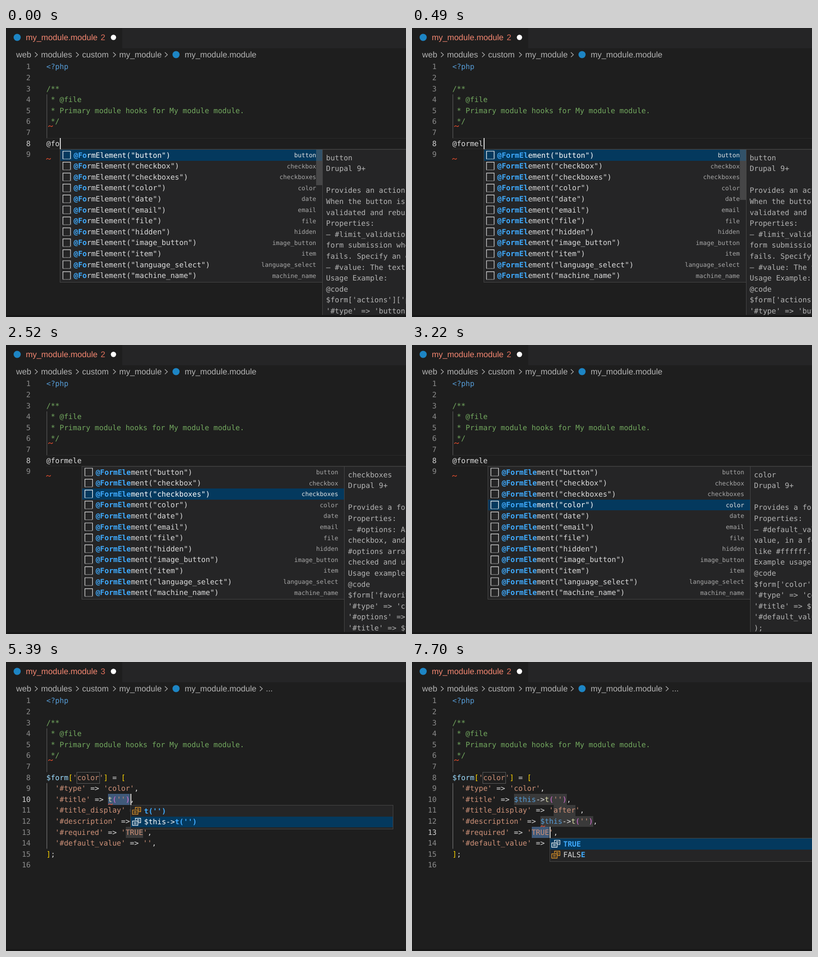
An HTML page that plays this animation: 788x570 px, repeating every 8 s.

```html
<!DOCTYPE html>
<html lang="en">
<head>
<meta charset="utf-8">
<title>Form element completion</title>
<style>
html, body { margin: 0; width: 100%; height: 100%; overflow: hidden; background: #1e1e1e; }
svg { display: block; }
rect { shape-rendering: crispEdges; }
text { white-space: pre; text-rendering: geometricPrecision; }
.code { font: 14.4px "DejaVu Sans Mono", monospace; }
.ui { font: 16.2px "Liberation Sans", Arial, sans-serif; fill: #b4b4b4; }
.hint { font: 12px "DejaVu Sans Mono", monospace; text-anchor: end; }
.match { font-weight: bold; fill: #3fabff; }
.num { text-anchor: end; fill: #8c8c8c; }
.stroke { fill: none; stroke-width: 1.2; }
</style>
</head>
<body>
<svg width="788" height="570" viewBox="0 0 788 570">
  <rect width="788" height="570" fill="#1e1e1e"/>
  <rect x="229" width="559" height="40" fill="#252526"/>
  <circle cx="22" cy="18.5" r="7" fill="#1d85c4"/>
  <circle cx="335" cy="52.5" r="7" fill="#1d85c4"/>
  <text class="ui" x="39" y="24" style="fill:#f48771">my_module.module</text>
  <circle cx="211.7" cy="18.5" r="5.2" fill="#fff"/>
  <g id="crumbs"></g>
  <g id="doc"></g>
  <rect id="cursor" width="2" height="21.6" fill="#d0d0d0"/>
  <g id="popup"></g>
  <rect id="thumb" y="240" width="12" fill="#797979"/>
  <path d="M0.5 0V570" stroke="#171717"/>
  <rect y="566" width="788" height="4" fill="#181818"/>
</svg>
<script>
const LOOP = 8000, LEFT = 79.5, CW = 8.669, LH = 21.6, TOP = 66, BASE = 15.4;
const $ = id => document.getElementById(id);
const colX = c => LEFT + c * CW;
const lineY = n => TOP + (n - 1) * LH;
const esc = s => s.replace(/&/g, "&amp;").replace(/</g, "&lt;").replace(/>/g, "&gt;");
const rect = (x, y, w, h, fill, more = "") =>
  `<rect x="${x}" y="${y}" width="${w}" height="${h}" fill="${fill}" ${more}/>`;
const path = (d, color) => `<path class="stroke" d="${d}" stroke="${color}"/>`;
const span = (s, fill) => `<tspan fill="${fill}">${esc(s)}</tspan>`;
const text = (x, y, body, cls = "code", fill = "#dcdcdc") =>
  `<text class="${cls}" x="${x}" y="${y}" fill="${fill}">${body}</text>`;
const squiggle = (x, y) => path(`M${x} ${y}q2 -3.6 4.3 -1.4t4.3 -1.2`, "#f0512f");
const codeLine = (n, body, fill) => text(LEFT, lineY(n) + BASE, body, "code", fill);

const elements = ["button", "checkbox", "checkboxes", "color", "date", "email", "file",
  "hidden", "image_button", "item", "language_select", "machine_name"];

const docs = [
  ["Provides an action button.", "When the button is pressed", "validated and rebuilt.",
    "Properties:", "– #limit_validation_errors", "form submission when it", "fails. Specify an empty",
    "– #value: The text to be", "Usage Example:", "@code", "$form['actions']['preview']",
    "'#type' => 'button',"],
  ["Provides a form element", "Properties:", "– #return_value: The", "checkbox is checked",
    "Usage example:", "@code", "$form['copy'] = array(", "'#type' => 'checkbox',",
    "'#title' => $this->t(", ");", "@endcode"],
  ["Provides a form element", "Properties:", "– #options: An array", "checkbox, and the",
    "#options array is", "checked and unchecked", "Usage example:", "@code",
    "$form['favorites'] =", "'#type' => 'checkboxes',", "'#options' => $list,",
    "'#title' => $this->t("],
  ["Provides a form element", "Properties:", "– #default_value:", "value, in a format",
    "like #ffffff.", "Example usage:", "@code", "$form['color'] = array(",
    "'#type' => 'color',", "'#title' => $this->t(", "'#default_value' =>", ");"]
];

const short = "t('')", long = "$this->t('')";
const choices = {
  10: [short, long], 11: ["before", "after", "invisible", "attribute"],
  12: [short, long], 13: ["TRUE", "FALSE"]
};

// Each step overrides part of the previous state.
const steps = [
  [0, { typed: 3, pick: 0, thumb: 70, line: 8, errors: 2, title: short, display: "before", desc: short }],
  [70, { typed: 4, thumb: 80 }],
  [210, { typed: 5, thumb: 90 }],
  [350, { typed: 6, thumb: 95 }],
  [490, { typed: 7, thumb: 99 }],
  [630, { typed: 8, thumb: 24 }],
  [2170, { pick: 1 }],
  [2520, { pick: 2 }],
  [2870, { pick: 3 }],
  [4060, { typed: 0, line: 10, pick: 0, endMark: true }],
  [4340, { more: true }],
  [4830, { errors: 3, endMark: false, titleMark: true }],
  [5390, { pick: 1 }],
  [5740, { line: 11, title: long, pick: 0 }],
  [6160, { pick: 1 }],
  [6510, { titleMark: false }],
  [6650, { line: 12, display: "after", pick: 0, errors: 2 }],
  [6790, { descMark: true }],
  [7070, { pick: 1 }],
  [7700, { line: 13, desc: long, pick: 0 }]
];
let last = {};
const states = steps.map(([at, change]) => last = { ...last, ...change, at });

// The caret starts visible and flips at each of these times.
const flips = [1120, 1680, 2170, 2730, 3220, 3780, 4480, 5040, 5600, 5740, 6230, 6650, 7280, 7700];

const tint = s => s.split(/(\$\w+|'[^']*'|[\[\]]|[()]|t(?=\())/).map(p => {
  const color = p === "$this" ? "#569cd6" : p[0] === "$" ? "#9cdcfe" : p[0] === "'" ? "#ce9178"
    : /^[\[\]]$/.test(p) ? "#ffd700" : /^[()]$/.test(p) ? "#da70d6" : p === "t" ? "#dcdcaa" : "#dcdcdc";
  return span(p, color);
}).join("");

const fields = s => ({ 10: [14, s.title], 11: [23, s.display], 12: [20, s.desc], 13: [18, "TRUE"] });
const caretX = s => {
  const [col, value] = s.typed ? [s.typed, ""] : fields(s)[s.line];
  return colX(col + value.length) + .6;
};

function crumbs(s) {
  const words = [[20, "web"], [69, "modules"], [150, "custom"], [223, "my_module"], [352, "my_module.module"]];
  const arrows = [56, 137, 210, 312];
  if (s.more) { words.push([512, "..."]); arrows.push(499); }
  return words.map(([x, w]) => text(x, 58, w, "ui")).join("")
    + arrows.map(x => path(`M${x + 1} 48l5 4.7l-5 4.7`, "#b4b4b4")).join("")
    + `<text class="ui" x="186.5" y="24" style="fill:#e0705c">${s.errors}</text>`;
}

function header() {
  const green = "#73a95f";
  return path(`M80.5 ${lineY(4)}V${lineY(8)}`, "#555")
    + codeLine(1, esc("<?php"), "#569cd6")
    + ["/**", " * @file", " * Primary module hooks for My module module.", " */"]
      .map((l, i) => codeLine(i + 3, l, green)).join("")
    + squiggle(83.5, 195);
}

function formCode(s) {
  const body = ["$form['color'] = [", "  '#type' => 'color',", `  '#title' => ${s.title},`,
    `  '#title_display' => '${s.display}',`, `  '#description' => ${s.desc},`,
    "  '#required' => 'TRUE',", "  '#default_value' => '',", "];"];
  let out = path(`M80.5 ${lineY(9)}V${lineY(15)}`, "#707070");
  out += rect(colX(7) - .5, lineY(8) + .3, 5 * CW + 1, LH, "none", 'stroke="#5a5a5a"');
  for (const [n, [col, value]] of Object.entries(fields(s)))
    out += rect(colX(col), lineY(n), value.length * CW, LH, n == s.line ? "#405a7a" : "#3a3a3a");
  if (s.line === 12) out += rect(colX(21), lineY(10), 5 * CW, LH, "#4b4d50");
  out += body.map((l, i) => codeLine(i + 8, tint(l))).join("");
  if (s.endMark) out += squiggle(79.5, 411);
  if (s.titleMark) out += squiggle(201.5, 282);
  if (s.descMark) out += squiggle(253.5, 325.5);
  return out;
}

function doc(s) {
  let out = header();
  for (let n = 1; n <= (s.typed ? 9 : 16); n++)
    out += `<text class="code num" x="48.5" y="${lineY(n) + BASE}"${n === s.line ? ' style="fill:#d0d0d0"' : ""}>${n}</text>`;
  if (!s.typed) return out + formCode(s);
  return out + path("M79 217.5H788M79 238.5H788", "#2a2a2a")
    + codeLine(8, "@formele".slice(0, s.typed)) + squiggle(79.5, 259.5);
}

const snippetIcon = (x, y, color) =>
  path(`M${x + 6} ${y + 18}V${y + 3}h15v15`, color)
  + `<path class="stroke" d="M${x + 6} ${y + 18.3}h15.5" stroke="${color}" stroke-dasharray="1.5 1.5"/>`;

const valueIcon = (x, y, color) =>
  path(`M${x + 10} ${y + 7.5}v-4h10.5v8.5h-5M${x + 13} ${y + 6.3}h5M${x + 15.5} ${y + 9}h2.5`, color)
  + path(`M${x + 4.5} ${y + 8.8}h10.5v8.5h-10.5zM${x + 7} ${y + 11.7}h5.5M${x + 7} ${y + 14.4}h5.5`, color);

function popup(s) {
  const x = caretX(s), top = lineY(s.line + 1), typing = s.typed > 0;
  const items = typing ? elements : choices[s.line];
  const value = typing ? "" : fields(s)[s.line][1];
  let out = rect(x + .5, top + .5, 517, items.length * LH + 3.4, "#252526", 'stroke="#454545"');
  items.forEach((item, i) => {
    const y = top + 1.2 + i * LH, on = i === s.pick, fill = on ? "#fff" : "#dcdcdc";
    if (on) out += rect(x + 1, y, 516, LH, "#04395e");
    let label;
    if (typing) {
      label = `<tspan class="match">${"@FormElement".slice(0, s.typed)}</tspan>`
        + `${"@FormElement".slice(s.typed)}("${item}")`;
      out += snippetIcon(x, y, fill)
        + text(x + 505, y + 15, item, "hint", on ? "#e4e4e4" : "#a8a8a8");
    } else {
      let same = 0;
      while (same < Math.min(item.length, value.length) && item.at(-1 - same) === value.at(-1 - same)) same++;
      const cut = item.length - same;
      label = esc(item.slice(0, cut)) + `<tspan class="match">${item.slice(cut)}</tspan>`;
      out += valueIcon(x, y, on ? "#fff" : "#ee9d28");
    }
    out += text(x + 27.2, y + 15.6, label, "code", fill);
  });
  return typing ? out + details(x + 517, top, s.pick) : out;
}

function details(x, top, pick) {
  const lines = [elements[pick], "Drupal 9+", "", ...docs[pick]];
  return rect(x + .5, top + .5, 400, 400, "#252526", 'stroke="#454545"')
    + lines.map((l, i) => text(x + 7.4, top + 21.7 + i * LH, esc(l), "code", "#b4b4b4")).join("");
}

function show(s) {
  const x = caretX(s);
  $("crumbs").innerHTML = crumbs(s);
  $("doc").innerHTML = doc(s);
  $("popup").innerHTML = popup(s);
  $("cursor").setAttribute("x", x);
  $("cursor").setAttribute("y", lineY(s.line));
  $("thumb").setAttribute("x", x + 505);
  $("thumb").setAttribute("height", s.thumb);
}

const start = performance.now();
let shown = null;
function frame() {
  const t = (performance.now() - start) % LOOP;
  const s = states.findLast(v => v.at <= t);
  if (s !== shown) show(shown = s);
  const hidden = flips.filter(f => f <= t).length % 2;
  $("cursor").setAttribute("opacity", hidden ? 0 : 1);
  const fade = Math.min(1, Math.max(0, (t - 1000) / 800));
  $("thumb").setAttribute("opacity", s.typed ? .4 * (1 - fade) : 0);
  requestAnimationFrame(frame);
}
frame();
</script>
</body>
</html>
```
